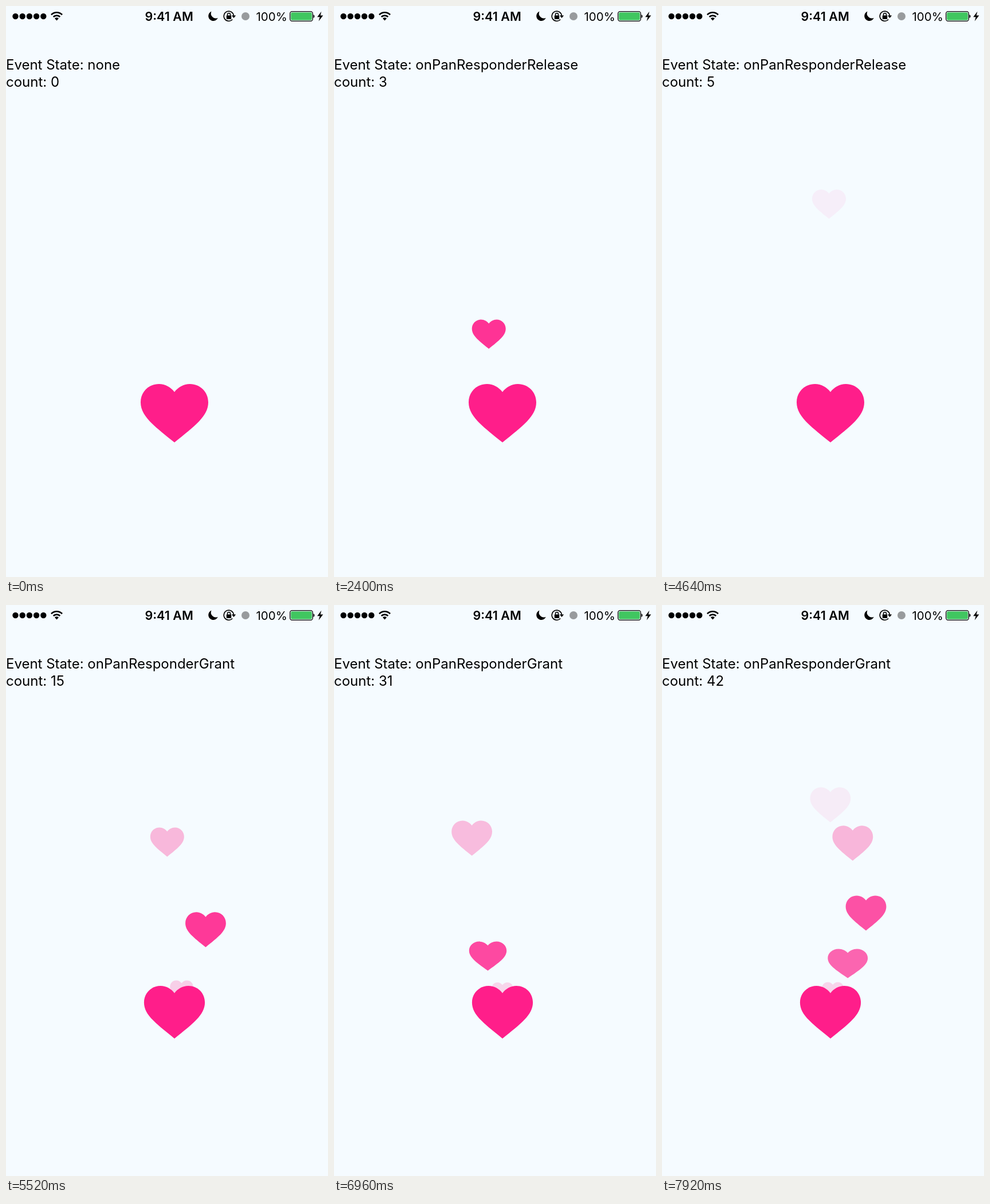
An HTML page that plays this animation: 562 px wide and 997 px high, repeating every 8000 ms.

```html
<!DOCTYPE html>
<html lang="en">
<head>
<meta charset="utf-8">
<title>Floating hearts</title>
<style>
  html, body { margin: 0; width: 100%; height: 100%; overflow: hidden; background: #f5fbff; }
  svg { display: block; width: 100%; height: 100%; }
  text { font-family: Inter, "Liberation Sans", sans-serif; fill: #000; }
  .info { font-size: 24px; }
  .time { font-size: 21.5px; font-weight: 600; }
  .level { font-size: 20.5px; }
  .line { fill: none; stroke: #000; }
</style>
</head>
<body>
<svg viewBox="0 0 562 997">
  <defs>
    <path id="heart" d="M0-37C-6-45-16-51-27-51C-45-51-59-37-59-19C-59 5-36 22 0 51C36 22 59 5 59-19C59-37 45-51 27-51C16-51 6-45 0-37Z"/>
  </defs>

  <g id="statusBar">
    <path class="line" d="M16.5 18h50" stroke-width="10.4" stroke-linecap="round" stroke-dasharray="0 12.2"/>
    <g class="line" stroke-width="2.7">
      <path d="M79 15.2a13.4 13.4 0 0 1 19 0"/>
      <path d="M82.7 19a8.2 8.2 0 0 1 11.6 0"/>
    </g>
    <path d="M88.5 25.6l-3.5-3.9a5 5 0 0 1 7 0z"/>
    <text class="time" x="242.5" y="25.5">9:41 AM</text>
    <path d="M358.5 9.5A8.6 8.6 0 1 0 369.8 20.7A8.5 8.5 0 0 1 358.5 9.5Z"/>
    <path class="line" stroke-width="1.6" d="M395.2 23.5A8.6 8.6 0 1 1 397.4 17"/>
    <path d="M393.8 16.5h7.4l-3.7 4.6z"/>
    <rect x="384.8" y="16.5" width="8.4" height="6.5" rx=".8"/>
    <path class="line" stroke-width="1.5" d="M386.5 17v-2a2.5 2.5 0 0 1 5 0v2"/>
    <circle cx="418" cy="18" r="7" fill="#989b9d"/>
    <text class="level" x="436.5" y="25.5">100%</text>
    <rect class="line" x="495.7" y="9.7" width="39.6" height="16.6" rx="3.5" stroke-width="1.3"/>
    <rect x="497.2" y="11.2" width="36.6" height="13.6" rx="2" fill="#40c660"/>
    <path d="M536.5 15q2 .5 2 3t-2 3z"/>
    <path d="M550.5 9.5l-7.3 9.7h4.5l-2 7.3 7.7-10h-4.7z"/>
  </g>

  <text class="info" id="state" x="0" y="111"></text>
  <text class="info" id="count" x="0" y="141"></text>
  <g id="floaters" fill="#ff1e8a"></g>
  <use id="button" href="#heart" fill="#ff1e8a"/>
</svg>
<script>
const LOOP = 8000, STEP = 80;
const CENTER = 294, BUTTON_Y = 711;
const START_Y = 692, END_Y = 331, SPEED = 0.34;
const SWAY = 60, KNEE = 0.35;
const FIRST_DOWN = 60, LABEL_START = 480, TAP = 130, PRESS_EASE = 140;
const HOLD_DOWN = 4650, COUNT_START = 4610, COUNT_TICK = 89;

const byId = id => document.getElementById(id);
const clamp = v => Math.max(0, Math.min(1, v));
const mix = (a, b, k) => a + (b - a) * k;

const taps = [689, 1190, 2050, 2913, 3622];
const holdBirths = [4702, 5152, 5464, 6122, 6728, 6911, 7108, 7467, 7726, 7870];

const presses = [
  ...taps.map((up, i) => ({ down: i ? up - TAP : FIRST_DOWN, up })),
  { down: HOLD_DOWN, up: Infinity }
];

function makeHeart(birth, phase, scale) {
  const node = document.createElementNS('http://www.w3.org/2000/svg', 'use');
  node.setAttribute('href', '#heart');
  byId('floaters').append(node);
  return { birth, scale, node, bend: SWAY * Math.cos(phase) };
}

// Taps swing from heart to heart; a hold sweeps slowly from side to side.
const hearts = [
  ...taps.map((t, i) => makeHeart(t, 1.35 * i - .72, i < 2 ? .6 : .5)),
  ...holdBirths.map((t, i) => makeHeart(t, (t - 5300) / 342, i % 4 ? .6 : .5))
];

function place(node, x, y, sx, sy) {
  node.setAttribute('transform', `translate(${x} ${y}) scale(${sx} ${sy})`);
}

function drift(bend, u) {
  return u < KNEE
    ? bend * Math.sin(u / KNEE * Math.PI / 2)
    : bend * mix(1, 1.3, (u - KNEE) / (1 - KNEE));
}

function drawHeart({ birth, scale, node, bend }, t) {
  const y = START_Y - (t - birth) * SPEED;
  const alive = y <= START_Y && y > END_Y;
  node.style.display = alive ? '' : 'none';
  if (!alive) return;
  const u = (START_Y - y) / (START_Y - END_Y);
  const entry = clamp((START_Y - y) / 98);
  const grow = .26 + 1.6 * entry;
  const sx = Math.min(grow, 1 + .56 * (1 - entry));
  const sy = Math.min(grow, 1);
  place(node, CENTER + drift(bend, u), y, scale * sx, scale * sy);
  node.setAttribute('opacity', Math.min(entry, (y - END_Y) / 270));
}

function drawButton(t) {
  const press = presses.findLast(p => t >= p.down);
  const depth = press
    ? clamp((t - press.down) / PRESS_EASE) * (1 - clamp((t - press.up) / PRESS_EASE))
    : 0;
  const s = 1 - .1 * depth;
  place(byId('button'), CENTER, BUTTON_Y, s, s);
}

function drawLabels(t) {
  const press = t >= LABEL_START && presses.findLast(p => t >= p.down);
  const state = !press ? 'none' : 'onPanResponder' + (t < press.up ? 'Grant' : 'Release');
  const tapped = taps.filter(up => t >= up).length;
  const held = Math.max(0, Math.floor((t - COUNT_START) / COUNT_TICK));
  byId('state').textContent = 'Event State: ' + state;
  byId('count').textContent = 'count: ' + (tapped + held);
}

let start;
function frame(now) {
  start ??= now;
  const t = Math.floor((now - start) % LOOP / STEP) * STEP;
  drawButton(t);
  drawLabels(t);
  hearts.forEach(heart => drawHeart(heart, t));
  requestAnimationFrame(frame);
}
requestAnimationFrame(frame);
</script>
</body>
</html>
```
